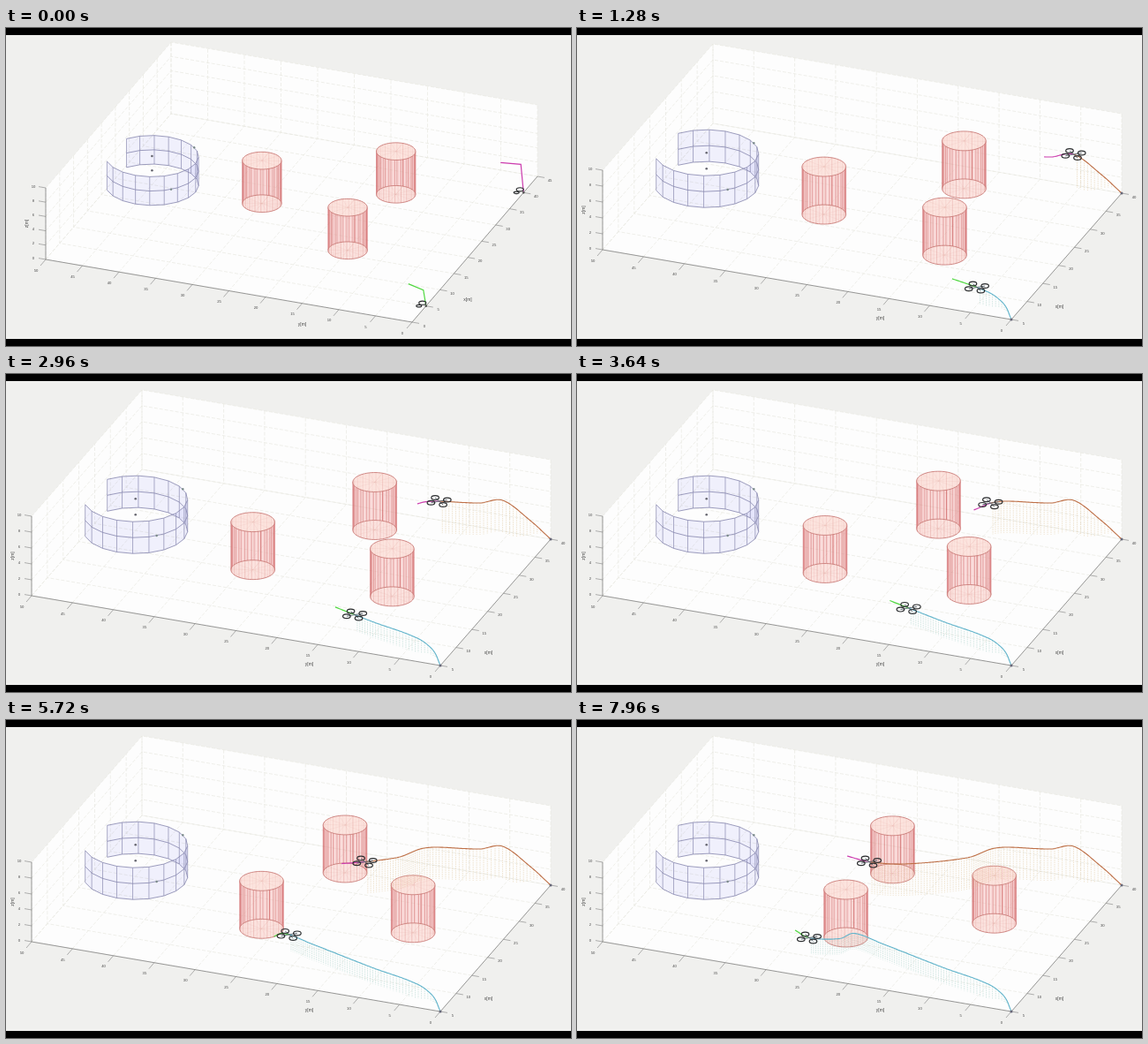
An HTML page with a canvas for the animation above (8 s loop, 640 by 360 pixels).

```html
<!DOCTYPE html>
<html lang="en">
<head>
<meta charset="utf-8">
<title>Drone path planning</title>
<style>
html, body { margin: 0; width: 100%; height: 100%; overflow: hidden; background: #000; }
canvas { display: block; width: 640px; height: 360px; }
</style>
</head>
<body>
<canvas id="stage" width="640" height="360"></canvas>
<script>
const ctx = document.getElementById('stage').getContext('2d');
const LOOP = 8000;
const LOOKAHEAD = 8;
const RAD = Math.PI / 180;

// Orthographic views: screen origin, x range and screen vector per world unit.
const startView = { ox: 460, oy: 333, x0: 0, x1: 45, ax: [142 / 45, -165 / 45], ay: [-8.3, -1.42], az: -8.1 };
const mainView = { ox: 492, oy: 330, x0: 5, x1: 40, ax: [125 / 35, -143 / 35], ay: [-9.26, -1.58], az: -9 };
let view = mainView;

const project = (x, y, z = 0) => [
  view.ox + (x - view.x0) * view.ax[0] + y * view.ay[0],
  view.oy + (x - view.x0) * view.ax[1] + y * view.ay[1] + z * view.az
];

// path: a few [step, x, y] turning points on the screen.
const drones = [
  {
    home: 5, trail: '#62b4cc', stem: 'rgba(150,200,190,.5)', lead: '#50d840', hover: 18, plan: [[-3, -18], [-20, -25]],
    path: [[0, 492, 330], [5, 484, 313], [10, 467, 299.5], [25, 415.5, 280.5], [50, 346.5, 253.5],
      [64, 314, 241.5], [72, 297, 247.5], [85, 263, 246.5], [93, 247, 238]]
  },
  {
    home: 40, trail: '#be7048', stem: 'rgba(220,190,140,.5)', lead: '#cc3cae', hover: 36, plan: [[-3, -32], [-26, -34]],
    path: [[0, 617, 187], [6, 594, 166], [14, 562.5, 143], [20, 537, 146], [36, 477, 144.5],
      [50, 441.5, 156], [72, 370.5, 163], [85, 331, 160.5], [93, 306, 154]]
  }
];

// Smooth interpolation through keys with uneven spacing.
function sample(keys, k) {
  let i = 0;
  while (i < keys.length - 2 && keys[i + 1][0] <= k) i++;
  const a = keys[i], b = keys[i + 1];
  const before = keys[i - 1] || a, after = keys[i + 2] || b;
  const span = b[0] - a[0], u = (k - a[0]) / span;
  return a.slice(1).map((p, j) => {
    const q = b[j + 1];
    const m = (q - before[j + 1]) / (b[0] - before[0]) * span;
    const n = (after[j + 1] - p) / (after[0] - a[0]) * span;
    return p + u * (m + u * (3 * (q - p) - 2 * m - n + u * (2 * (p - q) + m + n)));
  });
}

function pathBetween(path, from, to) {
  const points = [];
  for (let k = from; k < to; k += 0.5) points.push(sample(path, k));
  return [...points, sample(path, to)];
}

function trace(points, closed) {
  ctx.beginPath();
  points.forEach(p => ctx.lineTo(p[0], p[1]));
  if (closed) ctx.closePath();
}

function stroke(points, color, width = 0.7) {
  trace(points);
  ctx.strokeStyle = color;
  ctx.lineWidth = width;
  ctx.stroke();
}

function fill(points, color) {
  trace(points, true);
  ctx.fillStyle = color;
  ctx.fill();
}

function dot([x, y], r, color) {
  ctx.beginPath();
  ctx.arc(x, y, r, 0, 2 * Math.PI);
  ctx.fillStyle = color;
  ctx.fill();
}

function arc(cx, cy, z, r, from, to, step) {
  const points = [];
  for (let a = from; a <= to; a += step)
    points.push(project(cx + r * Math.cos(a * RAD), cy + r * Math.sin(a * RAD), z));
  return points;
}

function label(text, x, y, size = 4.2, turn = 0) {
  ctx.save();
  ctx.translate(x, y);
  ctx.rotate(turn);
  ctx.font = size + 'px "Liberation Sans", Arial, sans-serif';
  ctx.fillText(text, 0, 0);
  ctx.restore();
}

function drawAxes() {
  const { x0, x1 } = view, P = project;
  ctx.fillStyle = '#f0f0ee';
  ctx.fillRect(0, 8, 640, 344);
  fill([P(x0, 50, 10), P(x1, 50, 10), P(x1, 0, 10), P(x1, 0), P(x0, 0), P(x0, 50)], '#fdfdfd');

  const grid = '#e9e9e1';
  ctx.setLineDash([4, 2]);
  for (let x = x0; x <= x1; x += 5) stroke([P(x, 0), P(x, 50), P(x, 50, 10)], grid);
  for (let y = 0; y <= 50; y += 5) stroke([P(x0, y), P(x1, y), P(x1, y, 10)], grid);
  for (let z = 0; z <= 10; z += 2) stroke([P(x0, 50, z), P(x1, 50, z), P(x1, 0, z)], grid);
  ctx.setLineDash([]);

  const ink = '#808080';
  stroke([P(x0, 50, 10), P(x0, 50), P(x0, 0), P(x1, 0)], ink, 0.8);
  ctx.fillStyle = '#444';
  ctx.textAlign = 'center';
  ctx.textBaseline = 'middle';
  const tick = ([x, y], dx, dy, lx, ly, value) => {
    stroke([[x, y], [x + dx, y + dy]], ink, 0.6);
    label(value, x + lx, y + ly);
  };
  for (let x = x0; x <= x1; x += 5) tick(P(x, 0), 8, 1.4, 14, 4.5, x);
  for (let y = 0; y <= 50; y += 5) tick(P(x0, y), -6, 7, -11, 12.5, y);
  for (let z = 0; z <= 10; z += 2) tick(P(x0, 50, z), -8, -1.4, -14, -1.5, z);

  const title = (name, [x, y], dx, dy, turn) => label(name + '[m]', x + dx, y + dy, 5, turn);
  title('x', P((x0 + x1) / 2, 0), -8, 57);
  title('y', P(x0, 25), 83, 38);
  title('z', P(x0, 50, 5), -21, 0, -Math.PI / 2);
}

function drawRing() {
  const level = z => arc(25, 45, z, 5.95, 126, 414, 18);
  const low = level(0), high = level(4);
  for (let i = 0; i < low.length - 1; i++)
    fill([low[i], low[i + 1], high[i + 1], high[i]], 'rgba(110,110,240,.09)');
  low.forEach((p, i) => stroke([p, high[i]], '#8c8cb0', 0.7));
  [low, level(2), high].forEach(points => stroke(points, '#8484ac', 0.8));
  for (const z of [2, 4]) {
    dot(project(25, 45, z), 1.3, '#666670');
    dot(arc(25, 45, z, 5.95, 225 + 45.5 * (z - 2), 360, 360)[0], 1.2, '#7a8a88');
  }
}

function drawCylinder(angle) {
  const cx = 25 + 10 * Math.cos(angle * RAD), cy = 20 + 10 * Math.sin(angle * RAD);
  const ring = (z, step) => arc(cx, cy, z, 2.5, 0, 360, step);
  const disc = (z, color) => {
    const edge = ring(z, 6);
    fill(edge, color);
    ring(z, 36).forEach(p => stroke([project(cx, cy, z), p], 'rgba(215,140,130,.2)', 0.5));
    stroke(edge, '#c4706c', 0.8);
  };
  const [bx, by] = project(cx, cy), [, ty] = project(cx, cy, 6);
  const rx = 2.5 * Math.hypot(view.ax[0], view.ay[0]);
  const ry = 2.5 * Math.hypot(view.ax[1], view.ay[1]);
  ctx.beginPath();
  ctx.ellipse(bx, ty, rx, ry, 0, Math.PI, 0);
  ctx.ellipse(bx, by, rx, ry, 0, 0, Math.PI);
  ctx.fillStyle = 'rgba(250,195,190,.45)';
  ctx.fill();
  const top = ring(6, 9);
  ring(0, 9).forEach((p, i) => stroke([p, top[i]], i % 2 ? 'rgba(214,100,110,.35)' : 'rgba(195,75,75,.65)', 0.65));
  disc(0, 'rgba(252,228,222,.5)');
  disc(6, 'rgba(252,228,222,.75)');
}

function rotor(x, y, rx = 4.3, ry = 2.4) {
  ctx.beginPath();
  ctx.ellipse(x, y, rx, ry, 0, 0, 2 * Math.PI);
  ctx.strokeStyle = '#2c2e30';
  ctx.lineWidth = 1.2;
  ctx.stroke();
}

function drawParked({ home, plan, lead }) {
  const [x, y] = project(home, 0);
  stroke([[x, y], ...plan.map(([dx, dy]) => [x + dx, y + dy])], lead, 1.2);
  rotor(x - 4, y - 3.5, 4, 2.1);
  rotor(x - 8, y, 3, 1.2);
  dot([x, y], 1.3, '#555');
}

function drawDrone({ path, trail, stem, lead, hover }, k) {
  const [x, y] = sample(path, k);

  ctx.setLineDash([1.5, 1]);
  for (let i = 1; i < k; i++) {
    const [sx, sy] = sample(path, i);
    const climb = Math.min(1, i / 13);
    stroke([[sx, sy], [sx, sy + hover * climb * climb * (3 - 2 * climb)]], stem, 0.8);
  }
  ctx.setLineDash([]);

  stroke(pathBetween(path, 0, k), trail, 1.1);
  dot(path[0].slice(1), 1.5, '#667');
  stroke(pathBetween(path, k, k + LOOKAHEAD), lead, 1.2);

  const arms = [[-4.5, -4], [9.2, -1.5], [-9.2, 1.7], [4.5, 4]];
  arms.forEach(([dx, dy]) => stroke([[x, y], [x + dx, y + dy]], '#55606a', 0.9));
  arms.forEach(([dx, dy]) => rotor(x + dx, y + dy));
}

// Three steps share each 280 ms, held for 120, 40 and 120 ms.
function stepAt(time) {
  const rest = time % 280;
  return 3 * Math.floor(time / 280) + (rest >= 160 ? 2 : rest >= 120 ? 1 : 0);
}

function render(time) {
  const k = stepAt(time);
  view = k === 0 ? startView : mainView;
  ctx.fillStyle = '#000';
  ctx.fillRect(0, 0, 640, 360);
  drawAxes();
  drawRing();
  const angle = 1.48 * k ** 0.845;
  [330, 90, 210].forEach(phase => drawCylinder(phase + angle));
  drones.forEach(drone => k === 0 ? drawParked(drone) : drawDrone(drone, k));
}

const begin = performance.now();
function animate() {
  render((performance.now() - begin) % LOOP);
  requestAnimationFrame(animate);
}
animate();
</script>
</body>
</html>
```
